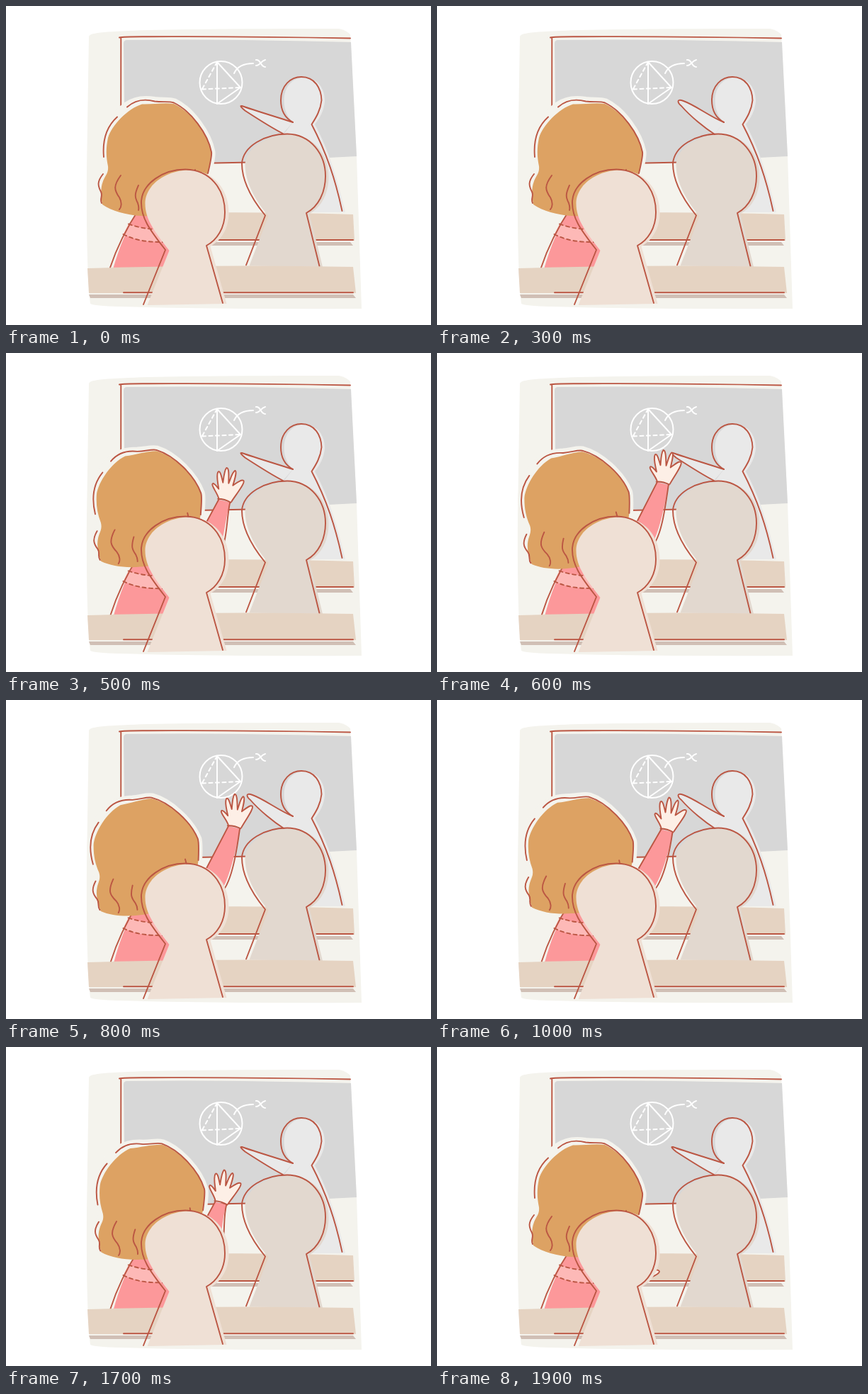
These frames come from a looping animation (600x450 px, 2000 ms). An HTML page:

```html
<!DOCTYPE html>
<html lang="en">
<head>
<meta charset="utf-8">
<title>Classroom</title>
<style>
  html, body { margin: 0; width: 100%; height: 100%; overflow: hidden; background: #fff; }
  svg { display: block; width: 100vw; height: 100vh; }
  .line { fill: none; stroke: #bb5643; stroke-width: 1.9; stroke-linecap: round; stroke-linejoin: round; }
  .chalk { fill: none; stroke: #fff; stroke-width: 2; stroke-linecap: round; stroke-linejoin: round; }
  .dash { stroke-dasharray: 5 4.5; }
  .desk { fill: #e5d3c2; }
  .shade { fill: #d0bfb5; }
  .skin { fill: #fdefe6; }
  .grey { fill: #e9e9e9; }
</style>
</head>
<body>
<svg viewBox="0 0 600 450">
  <defs>
    <path id="near" d="M194 421L225 344C205 318 190 300 191 275C193 250 222 230.500 253 230.500C288 231 309 258 309 291C309 313 298 330 283 338L306 419"/>
    <path id="far" d="M339 365.500L366 295.500C350 276 333 250 333 222C335 198 365 180.500 397 180.500C431 181 451 210 451 240C451 263 441 283 424 292L442.500 367"/>
  </defs>

  <!-- room -->
  <path fill="#f4f3ed" d="M117 43C118 37 145 36 200 34C290 32 390 32 470 32Q480 34 486 40L495 212L502 427Q300 428 160 424Q125 423 119 420Q113 370 114 230Z"/>
  <path fill="#d7d7d7" d="M166 53Q166 48 171 48Q300 46 487 51L495 212L296 222L168 222Z"/>
  <path class="line" d="M160 44.500Q166 43 200 43.200Q340 42.800 486 45.500M162.300 44.500L162.200 150M270 222L345 220.500"/>

  <g class="chalk">
    <circle cx="303.500" cy="108" r="30"/>
    <path d="M298 138V79L331 115L298 138M322 95C326 86 336 81 349 81M353 76C360 75 359 86 366 86M366 76C360 77 359 84 353 84"/>
    <path class="dash" d="M298 79L277 117M277 117.500L331 115"/>
  </g>

  <!-- teacher -->
  <path class="grey" d="M405 164C398 158 392.500 147 392.500 134C392.500 113 405 101 420 101C440 101 450 116 450 134C449 148 443 158 436 167C457 205 469 250 479 291H400V181H392Z"/>
  <path id="pointer" class="line grey"/>
  <path class="line" d="M405 164C394 158 388 147 388 133C388 112 402 100 417 100C436 100 445 116 445.500 133C444 147 438 157 431.500 167C453 208 465 245 474.500 289"/>

  <!-- back row -->
  <path class="desk" d="M240 292Q360 290 490 294L492 331H240Z"/>
  <path class="shade" d="M240 333H486L490 338H240Z"/>
  <path class="line" d="M270 330H490"/>
  <use href="#far" fill="#e2d8cf" transform="translate(4.500 1)"/>
  <use href="#far" class="line"/>

  <!-- pupil -->
  <g id="body">
    <path fill="#fc989a" d="M190 284C171 312 160 340 151 371H222L231 345L232 300Z"/>
    <path fill="#fdb9b7" d="M173 307.500C185 312 197 314 209 315L222 333C200 333 183 331 165.500 322Z"/>
    <path class="line" d="M188 286C169 315 156 342 147 369"/>
    <path class="line dash" d="M173 307.500C185 312 197 314 209 315M165.500 322C183 331 200 333 222 333"/>
  </g>
  <g id="head">
    <path fill="#f4f3ed" stroke="#f4f3ed" stroke-width="11" stroke-linejoin="round" d="M165 145C182 130 200 132 210 133.500C222 135 230 133 238 136C261 147 285 180 290 206Q291 211 285 236L230 280L190 290L138 277L137 237L144 225L139 212C137 190 142 165 165 145Z"/>
    <path fill="#dda263" d="M192 138.500C207 139 222 136 237 138C261 149 285 180 290 206Q291 211 285 236C272 280 230 300 190 296C170 295 149 289 136 280C134 268 133 257 137 247C140 239 145 236 144 226C141 212 141 200 144 186C149 169 171 145 192 138.500Z"/>
    <path class="line" d="M171 142.500C185 130 199 131.500 210 134.500C222 136 230 134 237 136.500C261 148 285 180 290 206Q291 211 285 236M157 156.500C142 170 136 190 138 213M137 237C129 247 129 253 134 262C137 268 132 272 135 278M162 239C151 254 153 260 160 270C164 277 163 284 160 287M187 253C181 266 182 270 186 278Q188 284 187 288M267 231L268 245"/>
  </g>
  <g id="arm">
    <path id="sleeve" fill="#fc989a"/>
    <path id="seams" class="line"/>
    <g id="hand">
      <path class="line skin" d="M-8-4C-10-11-16-18-17-23C-17-27-13-24-8-17C-9-25-12-36-9-41C-6-44-4-34-2-26C-1-34 0-44 3-47C7-47 6-34 6-25C9-32 11-41 15-43C18-42 15-32 12-22C18-26 24-31 27-29C30-26 17-10 10 1"/>
      <path class="line" d="M-9-3C-2-3 4-1 9 2"/>
    </g>
  </g>

  <!-- front row -->
  <path class="desk" d="M115 370Q300 364 490 368L494 405H117Z"/>
  <path class="shade" d="M117 407H490L494 412H119Z"/>
  <path class="line" d="M166 404.300H490"/>
  <use href="#near" fill="#efe0d5" transform="translate(5.500 1)"/>
  <use href="#near" class="line"/>
</svg>
<script>
  const LOOP = 2000, STEP = 100, TILT = 7.9;
  const el = id => document.getElementById(id);
  const set = (id, name, value) => el(id).setAttribute(name, value);

  const progress = (t, a, b) => Math.min(1, Math.max(0, (t - a) / (b - a)));
  const smooth = u => (1 - Math.cos(Math.PI * u)) / 2;
  const mix = (a, b, u) => a + (b - a) * u;

  const down = "M405 164C380 156 350 147 333 141C329 140 333 144 338 148C355 159 375 172 391 180";
  const up = "M405 164C385 156 365 140 348 134C337 130 340 137 345 141C358 156 378 172 392 181";
  const pointing = [[100, 500], [800, 900], [1000, 1500], [1800, 1900]];

  // The head swings past its resting tilt, then settles; 1 is the resting tilt.
  function lean(t) {
    const rise = Math.sin(progress(t, 300, 700) * Math.PI / 2);
    const settle = smooth(progress(t, 700, 1000));
    const fall = smooth(progress(t, 1600, 1900));
    return rise * mix(1.54, 1, settle) * (1 - fall);
  }

  function drawArm(t, over) {
    const rise = 1 - (1 - progress(t, 300, 700)) ** 2.5;
    const lift = rise * (1 - smooth(progress(t, 1600, 1900))) + 0.08 * over;
    const x = mix(276, 324.5, lift ** 2) - 14 * over;
    const y = mix(328, 184.5, lift);
    const tilt = 30 * (1 - lift) ** 2 - 7 * over;

    // The lower end of the sleeve sinks behind the front row with the hand.
    const drop = Math.max(0, y - 215);
    const bx = -drop * 0.2, by = drop * 0.8;
    const left = [x - 8, y - 2], right = [x + 8, y + 2];
    const shoulder = [266 + bx, 270 + by], elbow = [308 + bx, 267 + by];
    const bend = [x + 4, mix(y, elbow[1], 0.35)];
    const heel = [elbow[0] + (x - 300) * 0.55, elbow[1] - 18];
    const inset = ([px, py], d) => [px - d, py];
    set("sleeve", "d", `M${left}L${shoulder}L${inset(elbow, 3)}C${inset(heel, 4)} ${inset(bend, 1)} ${right}Z`);
    set("seams", "d", `M${left}L${shoulder}M${right}C${bend} ${heel} ${elbow}`);
    set("hand", "transform", `translate(${x} ${y}) rotate(${tilt})`);
  }

  function draw(ms) {
    const t = Math.floor(ms % LOOP / STEP) * STEP;
    const sway = lean(t), tilt = -TILT * sway;
    const raised = pointing.some(([a, b]) => t >= a && t < b);
    set("pointer", "d", raised ? up : down);
    set("head", "transform", `rotate(${tilt} 227 300)`);
    set("body", "transform", `rotate(${tilt * 0.1} 165 325)`);
    el("arm").style.display = t > 300 ? "" : "none";
    drawArm(t, Math.max(0, sway - 1));
  }

  const start = performance.now();
  function tick() {
    draw(performance.now() - start);
    requestAnimationFrame(tick);
  }
  tick();
</script>
</body>
</html>
```
